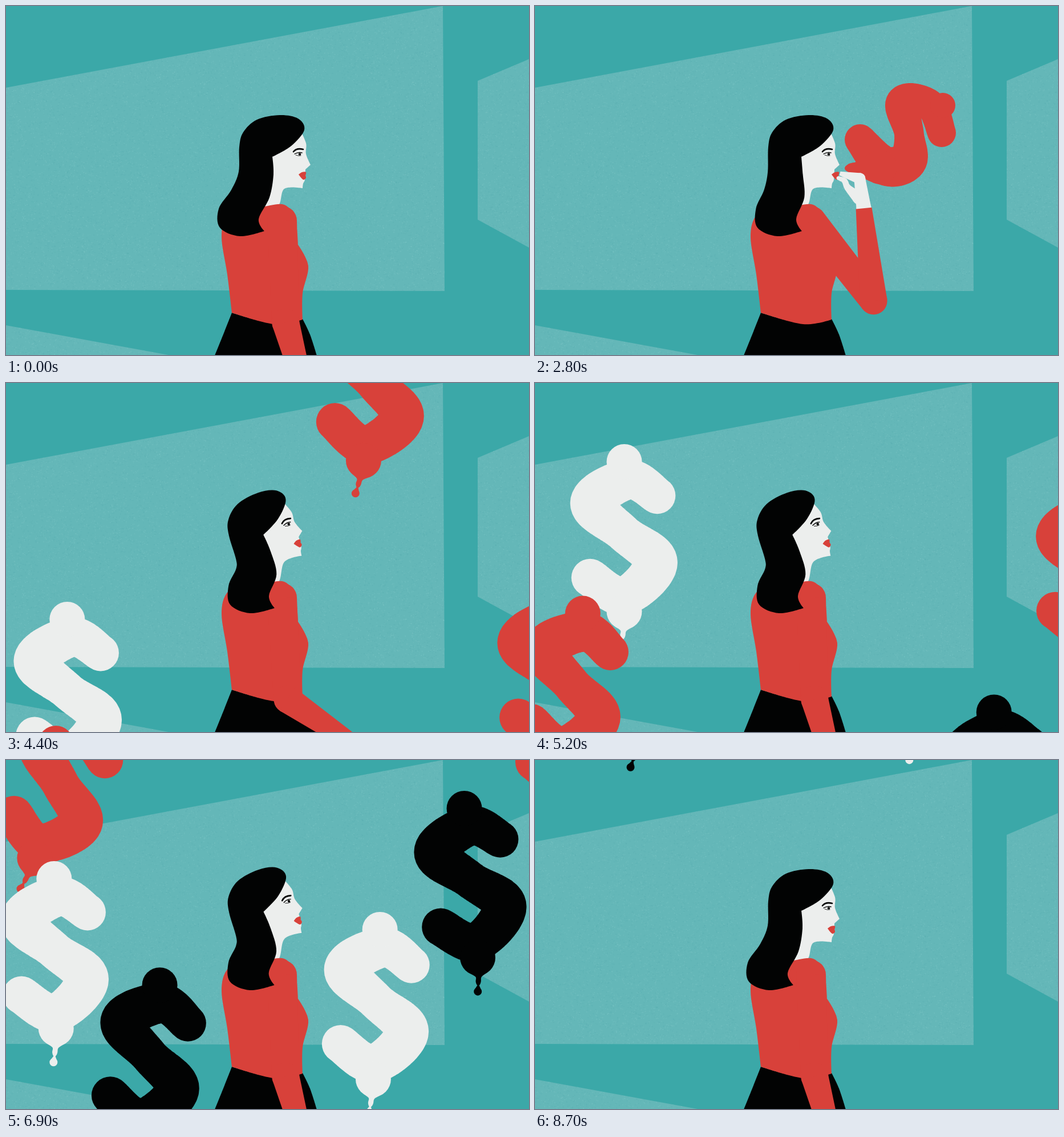
An HTML page with a canvas that plays this animation: 917 px wide and 611 px high, repeating every 8800 ms.

```html
<!DOCTYPE html>
<html lang="en">
<head>
<meta charset="utf-8">
<title>Balloons</title>
<style>
html, body { margin: 0; width: 100%; height: 100%; overflow: hidden; background: #3ba8a8; }
canvas { display: block; width: 100vw; height: 100vh; }
</style>
</head>
<body>
<canvas id="stage" width="917" height="611"></canvas>
<script>
const LOOP = 8800, STEP = 100, W = 917, H = 611;
const RED = '#d8413a', WHITE = '#eceeed', BLACK = '#020303', TEAL = '#3ba8a8', LIGHT = '#64b7b8';
const ctx = document.getElementById('stage').getContext('2d');

// ---- helpers ----
const rad = degrees => degrees * Math.PI / 180;
const linear = p => p;
const smooth = p => p * p * (3 - 2 * p);
const ramp = (v, from, to) => smooth(Math.min(1, Math.max(0, (v - from) / (to - from))));
const mix = (a, b, p) => Array.isArray(a) ? a.map((v, i) => mix(v, b[i], p)) : a + (b - a) * p;

// Blend between [time, ...values] keys, holding the first and last.
function track(t, keys, ease = smooth) {
  const next = keys.findIndex(key => t < key[0]);
  if (next === 0) return keys[0].slice(1);
  if (next < 0) return keys[keys.length - 1].slice(1);
  const [t0, ...a] = keys[next - 1], [t1, ...b] = keys[next];
  return mix(a, b, ease((t - t0) / (t1 - t0)));
}

function spline(a, b, c, d, p) {
  return b.map((v, i) => v + p * ((c[i] - a[i]) / 2 +
    p * (a[i] - 2.5 * v + 2 * c[i] - d[i] / 2 + p * (1.5 * (v - c[i]) + (d[i] - a[i]) / 2))));
}

// Turn around the origin, then move; any radius is kept.
function place([x, y, ...rest], dx, dy, degrees) {
  const c = Math.cos(rad(degrees)), s = Math.sin(rad(degrees));
  return [dx + x * c - y * s, dy + x * s + y * c, ...rest];
}

// Swollen line along a spine of [x, y, radius] points.
function worm(spine, color) {
  const at = i => spine[Math.min(spine.length - 1, Math.max(0, i))];
  ctx.beginPath();
  for (let s = 0; s <= spine.length - 1; s += 1 / 32) {
    const i = Math.floor(s);
    const [x, y, r] = spline(at(i - 1), at(i), at(i + 1), at(i + 2), s - i);
    ctx.moveTo(x + r, y);
    ctx.arc(x, y, r, 0, 2 * Math.PI);
  }
  ctx.fillStyle = color;
  ctx.fill();
}

// Tapered limb: round at the start, flat at the end.
function limb([x0, y0, r0], [x1, y1, r1], color) {
  const a = Math.atan2(y1 - y0, x1 - x0), nx = -Math.sin(a), ny = Math.cos(a);
  worm([[x0, y0, r0]], color);
  ctx.beginPath();
  ctx.moveTo(x0 + nx * r0, y0 + ny * r0);
  ctx.lineTo(x1 + nx * r1, y1 + ny * r1);
  ctx.lineTo(x1 - nx * r1, y1 - ny * r1);
  ctx.lineTo(x0 - nx * r0, y0 - ny * r0);
  ctx.fill();
}

// Closed smooth outline; the listed corners stay sharp.
function blob(pts, color, corners = []) {
  const n = pts.length, at = i => pts[(i + n) % n];
  const tangent = (i, axis) => corners.includes(i % n) ? 0 : (at(i + 1)[axis] - at(i - 1)[axis]) / 6;
  ctx.beginPath();
  ctx.moveTo(...pts[0]);
  for (let i = 0; i < n; i++) {
    const [x, y] = at(i), [x1, y1] = at(i + 1);
    ctx.bezierCurveTo(x + tangent(i, 0), y + tangent(i, 1),
      x1 - tangent(i + 1, 0), y1 - tangent(i + 1, 1), x1, y1);
  }
  ctx.fillStyle = color;
  ctx.fill();
}

// ---- background, painted once ----
function paintRoom() {
  const room = document.createElement('canvas');
  room.width = W; room.height = H;
  const c = room.getContext('2d');
  let seed = 7;
  const random = () => (seed = (seed * 1664525 + 1013904223) % 4294967296) / 4294967296;
  c.fillStyle = TEAL;
  c.fillRect(0, 0, W, H);
  const walls = new Path2D('M0 143L766 0L769 499L0 497ZM827 131L917 93V423L827 374ZM0 559L285 611H0Z');
  c.fillStyle = LIGHT;
  c.fill(walls);
  c.clip(walls);
  for (let i = 0; i < 30000; i++) {
    c.fillStyle = random() < 0.55 ? 'rgba(125,200,198,.3)' : 'rgba(82,168,174,.22)';
    c.fillRect(random() * W, random() * H, 1 + random() * 1.5, 1 + random());
  }
  return room;
}
const room = paintRoom();

// ---- balloons: body, bump on top and tied tail, each a spine ----
const DOLLAR = [
  [[61, -69, 32], [12, -99, 35], [-53, -60, 39], [0, -5, 33], [55, 48, 38], [-3, 105, 34], [-61, 71, 33]],
  [[5, -130, 31]],
  [[-3, 132, 31], [-5, 161, 7], [-7, 174, 4.5], [-8, 181, 2], [-10, 191, 7]]
];
const SNAKE = [
  [[713, 222, 25], [693, 174, 27], [646, 170, 31], [656, 225, 26], [653, 271, 34], [612, 279, 34], [570, 234, 27]],
  [[715, 174, 22]],
  [[605, 282, 30], [580, 284, 18], [565, 285, 12], [555, 284, 9], [548, 284, 5]]
];
const settle = pose => DOLLAR.map(part => part.map(point => place(point, ...pose)));
const drawShape = (shape, color) => shape.forEach(spine => worm(spine, color));

// Balloons climb steadily, also before the first key and after the last.
function drift(t, keys) {
  let i = 1;
  while (i < keys.length - 1 && t > keys[i][0]) i++;
  const [t0, , y0] = keys[i - 1], [t1, , y1] = keys[i];
  const [x, , tilt] = track(t, keys, linear);
  return [x, mix(y0, y1, (t - t0) / (t1 - t0)), tilt];
}

function drawBalloon(t, keys, color) {
  const pose = drift(t, keys);
  if (Math.abs(pose[1] - H / 2) < H) drawShape(settle(pose), color);
}

// Each key: time, x, y, tilt. Listed from back to front.
const FLOATERS = [
  [RED, [4400, 956, 512, -2.5], [6000, 987, 141, 0]],
  [WHITE, [4400, 108, 544, -2.5], [6000, 203, -8, -1]],
  [RED, [4400, 71, 760, 5], [6000, 55, 304, 9], [6900, 94, 47, 18], [7500, 138, -148, 12]],
  [BLACK, [6000, 810, 475, -4.5], [7500, 817, 41, -8.5]],
  [WHITE, [6000, 105, 641, 0], [6900, 85, 338, -2.5], [7500, 102, 136, -2.5]],
  [WHITE, [6000, 650, 737, 2], [7500, 648, 220, 0], [8700, 663, -191, -1]],
  [BLACK, [6900, 251, 523, 6], [7500, 195, 332, 16.5], [8700, 204, -175, 8]]
];

const MOUTH = [533, 292, 0], BLOW = 1700, RELEASE = 4000, HELD = [608, 113, 20];
const SPECK = SNAKE.map(part => part.map(point => mix(MOUTH, point, 0.03)));
const INFLATE = [[BLOW, ...SPECK], [2800, ...SNAKE], [3700, ...settle(HELD)]];
const RISE = [[RELEASE, ...HELD], [4400, 646, 5, 7], [5000, 660, -190, 4]];

function drawBlownBalloon(t) {
  if (t >= RELEASE) drawBalloon(t, RISE, RED);
  else if (t >= BLOW) drawShape(track(t, INFLATE, linear), RED);
}

// ---- woman ----
const TORSO = [[447, 352], [488, 348], [507, 375], [512, 418], [530, 455], [520, 503], [520, 549],
  [470, 557], [396, 537], [388, 470], [378, 405], [387, 368], [415, 355]];
const SKIRT = [[396, 537], [383, 570], [366, 612], [545, 612], [533, 575], [520, 548], [470, 556]];
const HAIR = [[523, 217], [512, 197], [480, 191], [440, 199], [416, 221], [409, 247], [408, 290], [395, 322],
  [373, 355], [375, 388], [410, 403], [453, 394], [443, 373], [462, 335], [469, 295], [467, 264], [500, 245]];
const FACE = [[465, 250], [515, 215], [526, 240], [526, 259], [534, 278], [525, 286], [524, 304],
  [521, 311], [520, 319], [488, 320], [477, 350], [445, 356]];
const LIPS = [[513, 295], [519, 291], [526, 291], [525, 297], [526, 301], [521, 304]];
const NECK = [465, 316];

// Each key: time, backward tilt of the head, swing of the hair, pursing of the lips.
const HEAD = [[900, 0, 0, 0], [1600, 0, 15, 7], [3900, 0, 15, 7], [4300, 17.5, 18, 0],
  [6800, 17.5, 18, 0], [8100, 0, 0, 0]];

// Tilt a head outline around the neck, fading out below it.
function nod(pts, tilt, fadeFrom, fadeTo) {
  return pts.map(([x, y]) => place([x - NECK[0], y - NECK[1]], ...NECK, -tilt * (1 - ramp(y, fadeFrom, fadeTo))));
}

function stroke(width, path) {
  ctx.lineWidth = width;
  ctx.lineCap = 'round';
  ctx.strokeStyle = BLACK;
  ctx.stroke(new Path2D(path));
}

function drawFeatures(tilt, purse) {
  ctx.save();
  ctx.translate(...NECK);
  ctx.rotate(rad(-tilt));
  ctx.translate(-NECK[0], -NECK[1]);
  stroke(2.6, 'M504 255Q510 248 521 251');
  stroke(1.4, 'M506 259Q513 255 519 257');
  stroke(0.8, 'M508 261Q513 263 517 262');
  worm([[515, 259.4, 2.2]], BLACK);
  blob(LIPS.map(([x, y]) => [x + purse, y]), RED, [0, 3]);
  ctx.restore();
}

// Upper and lower arm angles over time.
const ARM = [[800, 88, 74.5], [1600, 52, -96], [3900, 52, -96], [4400, 87, 34], [4700, 88, 74.5]];
const reach = ([x, y], angle, length, r) =>
  [x + length * Math.cos(rad(angle)), y + length * Math.sin(rad(angle)), r];

function drawArm(t) {
  const [upper, lower] = track(t, ARM);
  const shoulder = [484, 376, 26];
  const elbow = reach(shoulder, upper, 178, 24);
  const wrist = reach(elbow, lower, 163, 14);
  ctx.save();
  ctx.translate(wrist[0], wrist[1]);
  ctx.rotate(rad(lower + 96));
  limb([0, 0, 13], [-7, -50, 10], WHITE);
  limb([-7, -52, 10], [-42, -61, 3.5], WHITE);
  worm([[-9, -18, 11], [-28, -36, 6], [-34, -48, 5], [-45, -53, 3]], WHITE);
  ctx.restore();
  limb(shoulder, elbow, RED);
  limb(elbow, wrist, RED);
}

function drawWoman(t) {
  const [tilt, swing, purse] = track(t, HEAD);
  blob(nod(FACE, tilt, 318, 345), WHITE, [0, 1, 4, 5, 8, 11]);
  blob(SKIRT, BLACK, [0, 2, 3, 5]);
  blob(TORSO, RED, [3, 6, 8]);
  drawFeatures(tilt, purse);
  drawArm(t);
  const swung = nod(HAIR, tilt, 285, 335).map(([x, y], i) => [x + swing * ramp(HAIR[i][1], 285, 365), y]);
  blob(swung, BLACK, [11, 15]);
}

function draw(t) {
  ctx.drawImage(room, 0, 0);
  for (const [color, ...keys] of FLOATERS) drawBalloon(t, keys, color);
  drawBlownBalloon(t);
  drawWoman(t);
}

const start = performance.now();
function tick() {
  const t = Math.max(0, performance.now() - start) % LOOP;
  draw(Math.floor(t / STEP) * STEP);
  requestAnimationFrame(tick);
}
tick();
</script>
</body>
</html>
```
